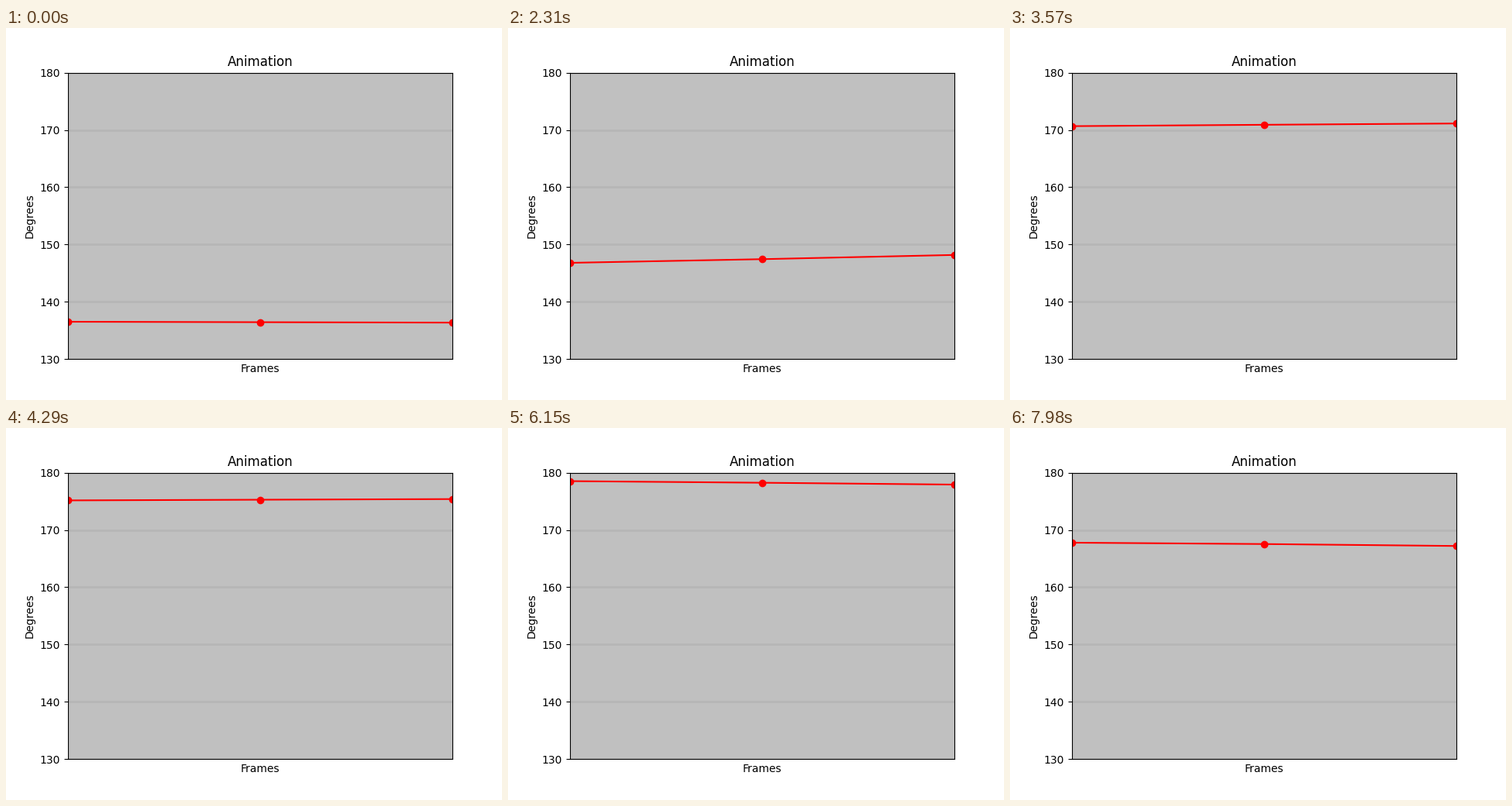
Write a matplotlib script that moves like this. It is 640x480 px and loops after 8 s.

```python
import numpy as np
import matplotlib.pyplot as plt
from matplotlib.animation import FuncAnimation

LOOP_MS = 8000
INTERVAL = 20
STEP_MS = 30  # time between samples

# key points of the motion: sample index, angle in degrees
KEYS = [(0, 136.52), (38, 135), (55, 136.2), (77, 146.8), (84, 152),
        (120, 170.9), (156, 176.05), (182, 176.15), (201, 179.07),
        (217, 174.06), (244, 165.95), (264, 167.97), (268, 167.2)]
X, Y = np.array(KEYS).T


def key_slopes():
    """Harmonic mean of neighbouring slopes, flat at turning points."""
    s = np.diff(Y) / np.diff(X)
    a, b = s[:-1], s[1:]
    inner = np.where(a * b > 0, 2 * a * b / (a + b), 0)
    return np.r_[2 * s[0] - inner[0], inner, 2 * s[-1] - inner[-1]]


M = key_slopes()


def angle(n):
    """Cubic Hermite curve through the key points."""
    k = np.clip(np.searchsorted(X, n, side="right") - 1, 0, len(X) - 2)
    h = X[k + 1] - X[k]
    t = (n - X[k]) / h
    ease = t * t * (3 - 2 * t)
    bend = h * t * (1 - t) * (M[k] * (1 - t) - M[k + 1] * t)
    return Y[k] + (Y[k + 1] - Y[k]) * ease + bend


plt.rcParams["font.family"] = "DejaVu Sans"
fig, ax = plt.subplots(figsize=(6.4, 4.8), dpi=100)
ax.set_facecolor("silver")
ax.set_title("Animation")
ax.set_xlabel("Frames")
ax.set_ylabel("Degrees", labelpad=4.7)
ax.set_xlim(0, 2)
ax.set_ylim(130, 180)
ax.set_xticks([])
ax.set_yticks(range(130, 181, 10))
ax.grid(axis="y", color="gray", linewidth=2, alpha=0.14)

window = np.arange(3)
line, = ax.plot(window, angle(window), color="red", marker="o")


def update(i):
    first = (i * INTERVAL + INTERVAL // 2) // STEP_MS
    line.set_ydata(angle(first + window))
    return line,


anim = FuncAnimation(fig, update, frames=LOOP_MS // INTERVAL,
                     interval=INTERVAL, repeat=True, repeat_delay=0)
plt.show()
```
